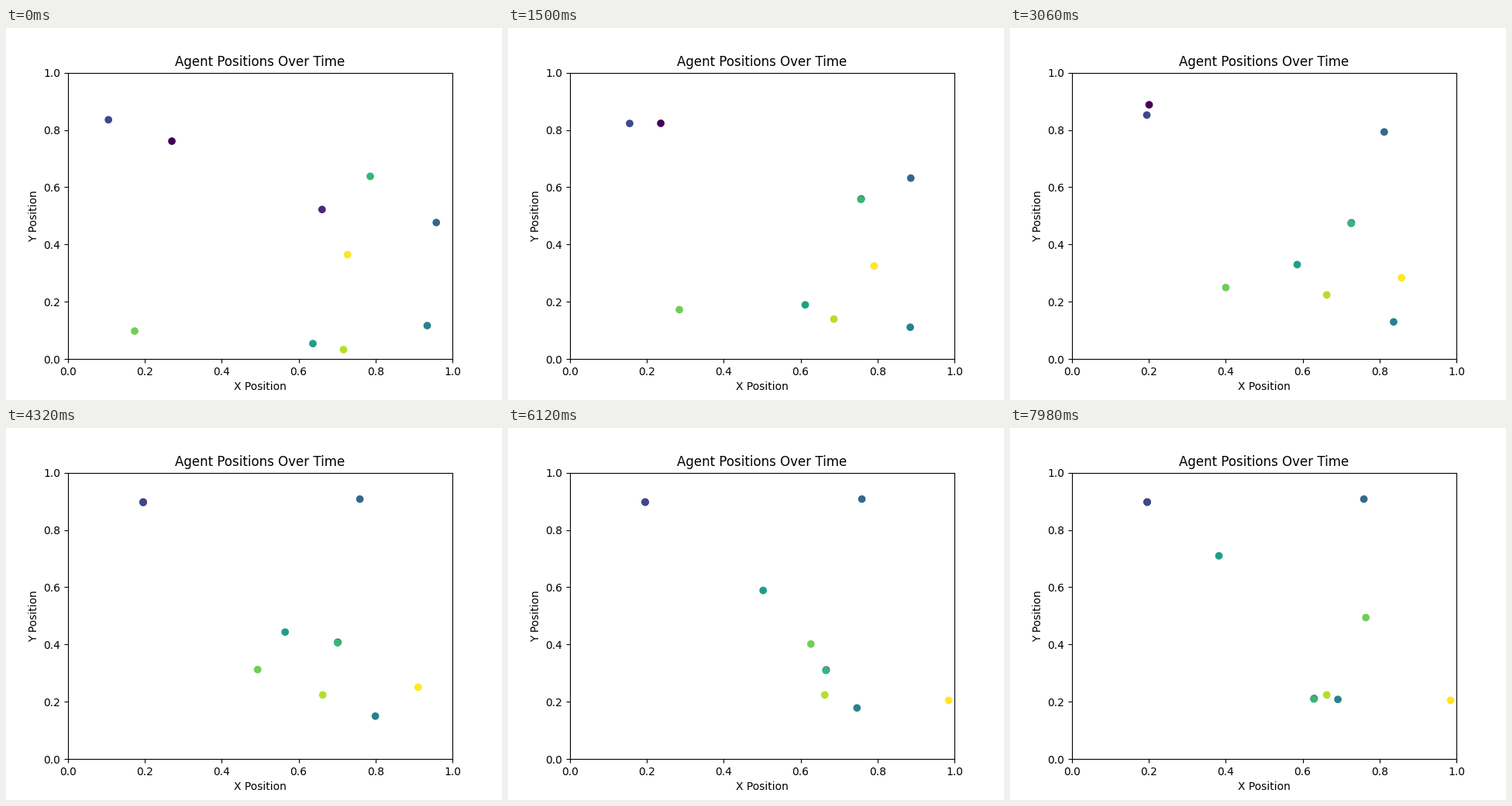
Write a matplotlib script that moves like this. It is 640x480 px and loops after 8 s.

```python
import numpy as np
import matplotlib.pyplot as plt
from matplotlib.animation import FuncAnimation

STEP_MS = 60
TICK_MS = 20
LOOP_MS = 8000
STEPS = np.arange(LOOP_MS // STEP_MS + 1)


def walk(speed, *stops):
    """Go along straight legs at constant speed and rest at the last stop."""
    stops = np.array(stops)
    legs = np.hypot(*np.diff(stops, axis=0).T)
    reach = np.concatenate([[0], np.cumsum(legs)])
    return np.column_stack([np.interp(speed * STEPS, reach, axis)
                            for axis in stops.T])


def chase(speed, start, leader):
    """Keep heading for the middle of the leader's latest step."""
    path = [np.array(start)]
    for aim in (leader[:-1] + leader[1:]) / 2:
        gap = aim - path[-1]
        share = min(1, speed / max(np.hypot(*gap), 1e-9))
        path.append(path[-1] + share * gap)
    return np.array(path)


home = (0.1956, 0.8972)
purple = walk(0.00284, (0.2702, 0.7608), home)
blue = walk(0.00683, (0.9581, 0.4767), (0.7593, 0.9077))
teal = walk(0.0055, (0.6371, 0.0541), (0.546, 0.545), home)
green = walk(0.00343, (0.7863, 0.638), (0.582, 0.081))
light = walk(0.00535, (0.1734, 0.0979), (0.882, 0.573))
lime = walk(0.00443, (0.7167, 0.033), (0.6627, 0.224))
yellow = walk(0.003, (0.7272, 0.3645), (0.985, 0.205))
indigo = chase(0.0058, (0.6609, 0.5222), green)
navy = chase(0.00208, (0.1052, 0.8355), purple)
petrol = chase(0.00201, (0.9345, 0.1169), lime)

agents = np.stack([purple, indigo, navy, blue, petrol,
                   teal, green, light, lime, yellow], axis=1)

fig, ax = plt.subplots(figsize=(6.4, 4.8), dpi=100)
dots = ax.scatter(*agents[0].T, c=range(agents.shape[1]), cmap="viridis")
ax.set(xlim=(0, 1), ylim=(0, 1), xlabel="X Position", ylabel="Y Position",
       title="Agent Positions Over Time")


def update(frame):
    dots.set_offsets(agents[frame * TICK_MS // STEP_MS])
    return (dots,)


anim = FuncAnimation(fig, update, frames=LOOP_MS // TICK_MS,
                     interval=TICK_MS, repeat=True, repeat_delay=0)
plt.show()
```
